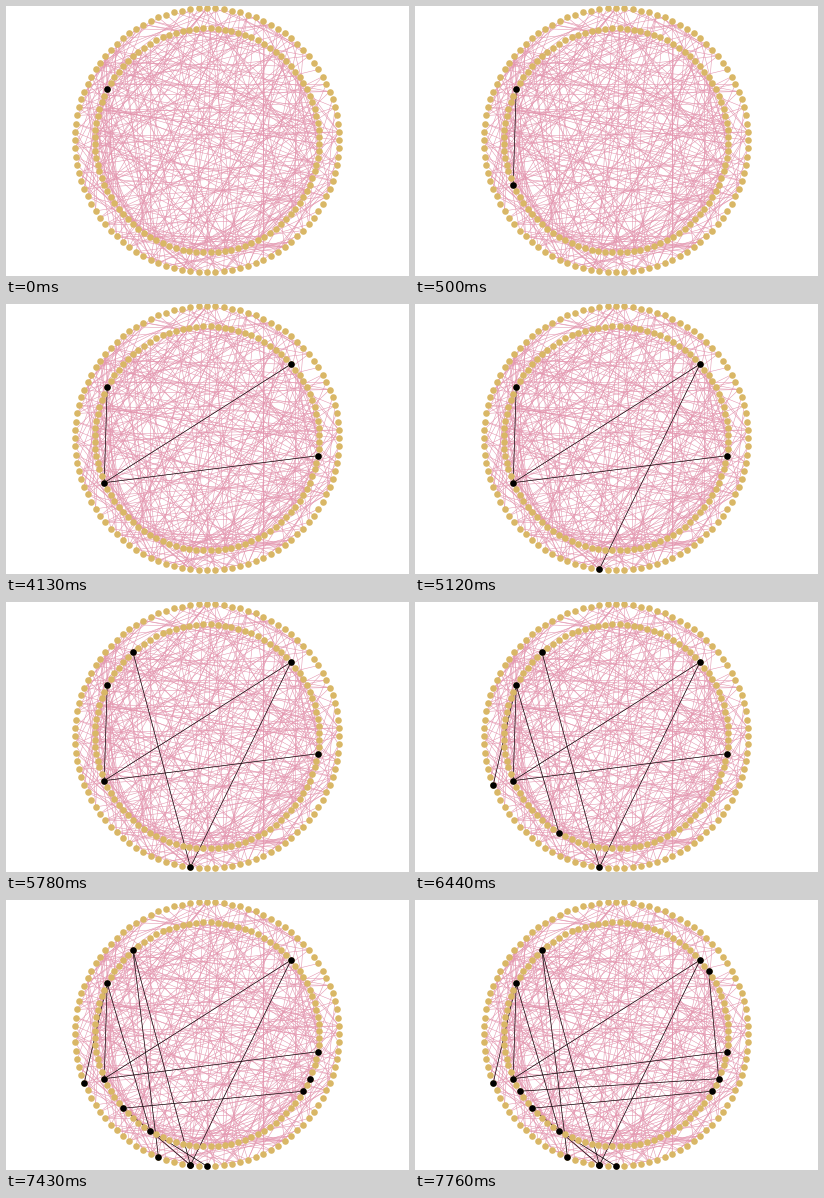
These frames come from a looping animation (403x270 px, 8000 ms). A matplotlib script:

```python
import math
import random

import matplotlib.pyplot as plt
from matplotlib.animation import FuncAnimation
from matplotlib.collections import LineCollection

W, H, DPI = 403, 270, 64
PT = 72 / DPI              # points per pixel
STEP, LOOP = 20, 8000      # ms
FIRST, TICK = 500, 330     # start of the spread and its beat, ms
N = 100                    # nodes per ring
CX, CY = 201, 134.2
INNER, OUTER = 112, 132
PINK, GOLD = "#e497b0", "#d9b766"

# (beat, from, to); ids below N lie on the inner ring, others on the outer
START = 57
LINKS = [
    (0, 57, 43), (3, 43, 88), (11, 43, 2), (14, 88, 127), (16, 127, 63),
    (18, 57, 33), (18, 57, 144), (19, 63, 131), (20, 33, 38), (20, 33, 127),
    (21, 33, 125), (21, 38, 8), (21, 8, 6), (22, 6, 41), (22, 6, 90),
]


def position(node):
    outer = node >= N
    radius = OUTER if outer else INNER
    angle = 2 * math.pi * (node % N + (0 if outer else 0.5)) / N
    return CX + radius * math.cos(angle), CY + radius * math.sin(angle)


def segments(edges):
    return [(position(a), position(b)) for a, b in edges]


def random_edges(count):
    rng = random.Random(11)
    return [rng.sample(range(2 * N), 2) for _ in range(count)]


def add_lines(edges, color, width, z):
    lines = LineCollection(segments(edges), colors=color,
                           linewidths=width * PT, zorder=z)
    ax.add_collection(lines)
    return lines


def add_dots(nodes, color, z):
    xs, ys = zip(*map(position, nodes))
    return ax.scatter(xs, ys, s=(6.6 * PT) ** 2, c=color, linewidths=0, zorder=z)


fig = plt.figure(figsize=(W / DPI, H / DPI), dpi=DPI, facecolor="white")
ax = fig.add_axes([0, 0, 1, 1])
ax.set_xlim(0, W)
ax.set_ylim(H, 0)
ax.axis("off")

links = [(a, b) for _, a, b in LINKS]
add_lines(links + random_edges(345), PINK, 0.55, 1)
path = add_lines([], "black", 0.65, 2)
add_dots(range(2 * N), GOLD, 3)
reached = add_dots([START], "black", 4)


def update(frame):
    end = (frame + 1) * STEP
    done = [(a, b) for beat, a, b in LINKS if FIRST + beat * TICK < end]
    path.set_segments(segments(done))
    reached.set_offsets([position(n) for n in [START] + [b for _, b in done]])
    return path, reached


anim = FuncAnimation(fig, update, frames=LOOP // STEP, interval=STEP,
                     repeat=True, repeat_delay=0)
plt.show()
```
